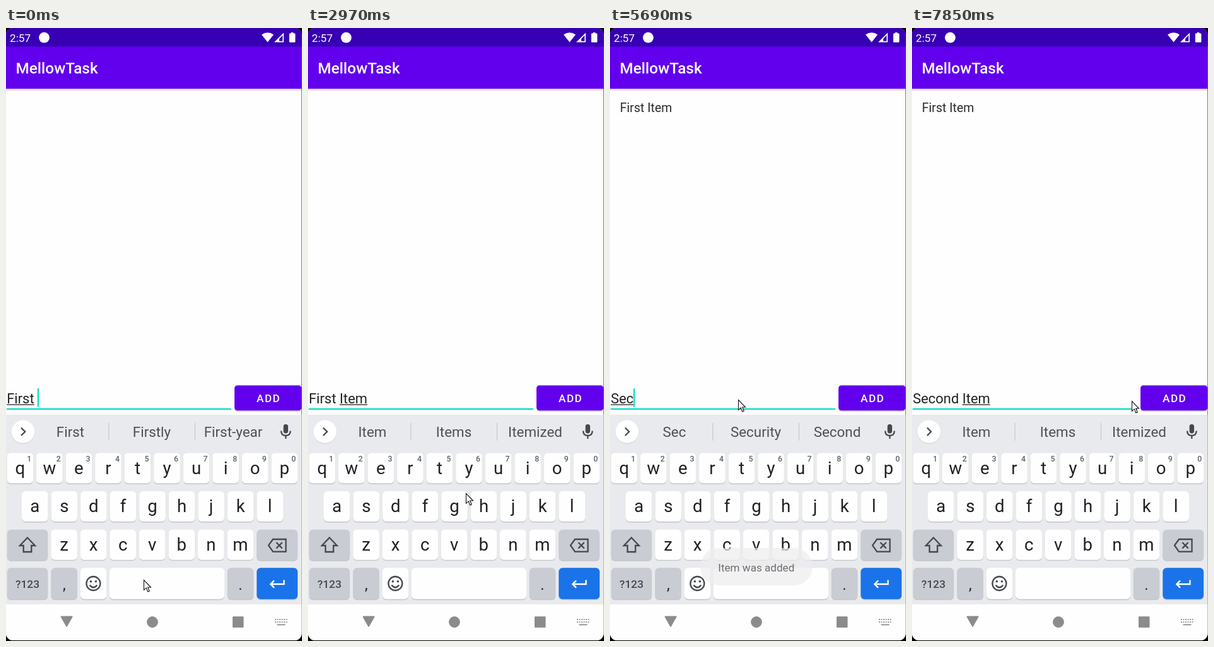
Recreate the animation shown at these times as an HTML page. Size 469 px wide and 970 px high, loop 8 s.

```html
<!DOCTYPE html>
<html lang="en">
<head>
<meta charset="utf-8">
<title>Todo list demo</title>
<style>
  html, body { margin: 0; width: 100%; height: 100%; overflow: hidden; background: #000; }
  svg { display: block; }
  text { font-family: Roboto, "Noto Sans", sans-serif; white-space: pre; }
  .mid { text-anchor: middle; }
  .med { font-weight: 500; }
  .line { fill: none; stroke: #45484d; stroke-width: 2.3; }
</style>
</head>
<body>
<svg id="stage" width="469" height="970" viewBox="0 0 469 970">
  <defs>
    <clipPath id="screen"><rect width="468.5" height="969" rx="11"/></clipPath>
    <linearGradient id="drop" x2="0" y2="1">
      <stop offset="0" stop-color="#000" stop-opacity=".22"/>
      <stop offset="1" stop-color="#000" stop-opacity="0"/>
    </linearGradient>
  </defs>
  <g clip-path="url(#screen)">
    <rect width="469" height="970" fill="#fefefe"/>

    <!-- status and app bars -->
    <rect y="96" width="469" height="4" fill="url(#drop)"/>
    <rect width="469" height="96" fill="#6200ee"/>
    <rect width="469" height="29.3" fill="#3700b3"/>
    <g fill="#fff">
      <text x="6" y="21.5" font-size="17.2">2:57</text>
      <circle cx="60.5" cy="15.2" r="8.4"/>
      <path d="M405 10.5Q414.5 4 424 10.5L414.5 22.5Z"/>
      <path d="M440 7.5V22.5H425ZM438.3 11.6L433 17V20.8H438.3Z" fill-rule="evenodd"/>
      <path d="M451.6 7H455.4V8.6H457.2Q458.4 8.6 458.4 9.8V21.6Q458.4 22.8 457.2 22.8H450Q448.8 22.8 448.8 21.6V9.8Q448.8 8.6 450 8.6H451.6Z"/>
      <text class="med" x="15.4" y="72.4" font-size="24.4">MellowTask</text>
    </g>

    <!-- list and input -->
    <text id="item" x="15.8" y="132.6" font-size="19.5" fill="#2b2b2b">First Item</text>
    <text id="hint" x="1.2" y="593.6" font-size="21.95" fill="#a0a0a0">Add an item here</text>
    <g id="typed">
      <text id="field" x="1.2" y="593.6" font-size="21.95" fill="#222"></text>
      <rect id="under" y="595.4" height="1.3" fill="#222"/>
    </g>
    <rect x="1" y="601.8" width="356" height="2.2" fill="#03dac5"/>
    <rect id="caret" width="2.2" fill="#03dac5"/>
    <g id="button">
      <rect x="362" y="567" width="106.3" height="40" rx="5" fill="#000" opacity=".18"/>
      <rect x="362" y="565.4" width="106.3" height="39.9" rx="4.8" fill="#6200ee"/>
      <rect id="ripple" x="362" y="565.4" width="106.3" height="39.9" rx="4.8" fill="#fff"/>
      <text class="med" x="397" y="592" font-size="17.1" letter-spacing="1.5" fill="#fff">ADD</text>
    </g>

    <!-- keyboard -->
    <rect y="612" width="469" height="300" fill="#e8eaed"/>
    <circle cx="27" cy="639.8" r="18.4" fill="#000" opacity=".1"/>
    <circle cx="27" cy="638.8" r="18.2" fill="#fff"/>
    <path id="chevron" class="line"/>
    <g id="words" font-size="22.4" fill="#4d5056">
      <path d="M163 625V653M299.5 625V653" stroke="#c6c8cc" stroke-width="1.2"/>
      <text class="mid" x="102" y="647.3"></text>
      <text class="mid" x="231" y="647.3"></text>
      <text class="mid" x="360" y="647.3"></text>
    </g>
    <g id="tools" class="line">
      <circle cx="86.5" cy="636" r="6.3"/><path d="M91 640.5L98.5 648"/>
      <path d="M149.5 629.5H162.5Q165 629.5 165 632V641L159 647.5H149.5Q147 647.5 147 645V632Q147 629.5 149.5 629.5ZM165 641H161Q159 641 159 643V647.5M151 639Q153 644 157.5 642.5" stroke-width="2"/>
      <path d="M152 634.5V637M160 634.5V637" stroke-width="2"/>
      <text class="mid" x="223.5" y="644" font-size="16" font-weight="900" letter-spacing="1" fill="#45484d" stroke="none">GIF</text>
      <path d="M283 630H300V649H283Z"/>
      <path d="M286.5 636.5H296.5M286.5 640.5H296.5M286.5 644.5H293.5" stroke-width="1.8"/>
      <path d="M287 629H296V633H287Z" fill="#45484d" stroke="none"/><circle cx="291.5" cy="628.8" r="2" fill="#45484d" stroke="none"/>
      <path d="M333.5 626V652" stroke="#c6c8cc" stroke-width="1.2"/>
      <g fill="#45484d" stroke="none">
        <circle cx="368" cy="639" r="2.5"/><circle cx="375.7" cy="639" r="2.5"/><circle cx="383.4" cy="639" r="2.5"/>
      </g>
    </g>
    <rect x="439.6" y="627" width="7.4" height="14.5" rx="3.7" fill="#45484d"/>
    <path class="line" d="M436 637.5Q436 645 443.3 645T450.6 637.5M443.3 645V650" stroke-width="2.2"/>
    <g id="keys"></g>
    <path class="line" d="M34 806.5L46 819H40.3V829H27.7V819H22Z"/>
    <path class="line" d="M416 818.7L423 809H443.5V828.7H423ZM428.3 814L437.7 823.4M437.7 814L428.3 823.4"/>
    <circle class="line" cx="138.4" cy="879" r="11"/>
    <circle cx="134.4" cy="875.8" r="1.8" fill="#45484d"/>
    <circle cx="142.4" cy="875.8" r="1.8" fill="#45484d"/>
    <path class="line" d="M132.5 881.5Q138.4 889 144.3 881.5" stroke-width="2"/>
    <path d="M440.5 873.5V880H419.5M425 874.3L419.2 880L425 885.7" fill="none" stroke="#fff" stroke-width="2.4"/>

    <!-- navigation bar -->
    <rect y="912" width="469" height="58" fill="#fefefe"/>
    <g fill="#8b8b8b" stroke="#8b8b8b" stroke-linejoin="round">
      <path d="M87.6 931.5H104.6L96.1 946.5Z" stroke-width="2"/>
      <circle cx="232" cy="940" r="8.4"/>
      <path d="M359.5 931.7H376V948.2H359.5Z"/>
    </g>
    <path d="M426 936H446M426 940H446" stroke="#999" stroke-width="2" stroke-dasharray="2 1.5"/>
    <path d="M429.5 944.3H442.5" stroke="#999" stroke-width="2"/>

    <g id="toast">
      <rect x="143" y="823" width="178" height="59" rx="29.5" fill="#eeeeef"/>
      <text class="mid" x="231.8" y="860" font-size="17.1" fill="#333">Item was added</text>
    </g>
    <path id="mouse" d="M.5 .5V16.3L4.2 12.9L6.8 19L9.3 18L6.7 12H11.5Z" fill="#fff" stroke="#111" stroke-width="1.1"/>
  </g>
</svg>
<script>
const LOOP = 8000, LEFT = 1.2, LINE = 25.7;
const $ = id => document.getElementById(id);
const set = (el, attrs) => { for (const k in attrs) el.setAttribute(k, attrs[k]); };
const show = (el, on) => set(el, { visibility: on ? "visible" : "hidden" });

function add(tag, attrs, label = "") {
  const el = document.createElementNS("http://www.w3.org/2000/svg", tag);
  set(el, attrs);
  el.textContent = label;
  $("keys").append(el);
}

function key(x, y, w, h, fill = "#fefefe") {
  add("rect", { x, y: y + 1.4, width: w, height: h, rx: 6, fill: "#c3c5c9" });
  add("rect", { x, y, width: w, height: h, rx: 6, fill });
}

function label(x, y, size, text, fill = "#1f2124", weight = 400) {
  add("text", { class: "mid", x, y, "font-size": size, fill, "font-weight": weight }, text);
}

function letters(row, x, y) {
  [...row].forEach((ch, i) => {
    const left = x + i * 46.55;
    key(left, y, 41.6, 48);
    label(left + 20.8, y + 33, 27.6, ch);
  });
}

function buildKeys() {
  const grey = "#c9ccd2";
  letters("qwertyuiop", 1.5, 672.5);
  [..."1234567890"].forEach((d, i) => label(36.8 + i * 46.55, 685.8, 12.4, d, "#5f6368", 500));
  letters("asdfghjkl", 25, 733);
  letters("zxcvbnm", 71.3, 793.7);
  key(1.8, 793.7, 64.4, 48.6, grey);
  key(397.3, 793.7, 64.8, 48.6, grey);
  key(1.8, 854.2, 64.4, 49.6, grey);
  key(71.5, 854.2, 41.4, 49.6, grey);
  key(118, 854.2, 41.4, 49.6);
  key(164, 854.2, 182, 49.6);
  key(350.8, 854.2, 41.4, 49.6, grey);
  key(397.3, 854.2, 64.8, 49.6, "#1a73e8");
  label(34, 885.6, 17.4, "?123", "#45484d", 500);
  label(92.3, 889, 24, ",");
  label(371.5, 889, 24, ".");
}

// Each step changes part of the state; mark is the underlined range of the text.
const steps = [
  [0, { text: "First ", mark: [0, 5], words: "First Firstly First-year", caret: 1, rows: 1, mouse: [218, 873], item: 0, toast: 0, ripple: 0 }],
  [120, { mark: null, words: "one day time" }],
  [390, { text: "First I", mark: [6, 7] }],
  [510, { words: "I I'm It" }],
  [630, { text: "First It", mark: [6, 8], words: "It It's Item" }],
  [910, { text: "First Item", mark: [6, 9], words: "Ite Item It's" }],
  [1190, { mark: [6, 10], words: "Item Items Itemized" }],
  [1310, { rows: 2 }],
  [1590, { mark: null, words: "I The My" }],
  [2020, { caret: 0 }],
  [2420, { rows: 1, caret: 1 }],
  [2540, { mark: [6, 10], words: "Item Items Itemized" }],
  [2970, { caret: 0, mouse: [250, 736] }],
  [3090, { mouse: [394, 627] }],
  [3240, { mouse: [409, 580] }],
  [3490, { text: "", mark: null, caret: 1, ripple: .24 }],
  [3610, { words: "", item: .5, ripple: .2 }],
  [3760, { item: 1, toast: .4, ripple: .12, mouse: [395, 585] }],
  [3880, { toast: 1, ripple: .05, mouse: [330, 588] }],
  [4000, { caret: 0, ripple: 0, mouse: [257, 586] }],
  [4120, { mouse: [202, 584] }],
  [4270, { mouse: [203, 588] }],
  [4520, { text: "s", caret: 1 }],
  [4640, { mark: [0, 1] }],
  [4760, { text: "", mark: null }],
  [4910, { text: "S" }],
  [5060, { mark: [0, 1] }],
  [5180, { words: "So Sorry Some" }],
  [5330, { text: "Se", mark: [0, 2] }],
  [5450, { words: "Se See Send" }],
  [5570, { text: "Sec", mark: [0, 3] }],
  [5690, { words: "Sec Security Second", toast: .7 }],
  [5840, { text: "Secon", mark: [0, 5], toast: .3 }],
  [5960, { text: "Second", mark: [0, 6], words: "Secon Second Seconds", toast: 0 }],
  [6210, { text: "Second ", words: "Second Seconds Secondary" }],
  [6330, { mark: null, words: "time one day" }],
  [6480, { text: "Second I", mark: [7, 8] }],
  [6600, { words: "I I'm Interview" }],
  [6880, { text: "Second It", mark: [7, 9], words: "It Item It's" }],
  [7030, { text: "Second Item", mark: [7, 10], words: "Ite Item It's" }],
  [7180, { mark: [7, 11], words: "Item Items Itemized" }],
  [7580, { mouse: [213, 587] }],
  [7730, { caret: 0, mouse: [290, 609] }],
  [7850, { mouse: [348, 590] }]
];

const pen = document.createElement("canvas").getContext("2d");
pen.font = '21.95px Roboto, "Noto Sans", sans-serif';
const widthOf = text => pen.measureText(text).width;
const wordSlots = $("words").querySelectorAll("text");

function draw(t) {
  const s = Object.assign({}, ...steps.filter(step => step[0] <= t).map(step => step[1]));
  const two = s.rows === 2;
  const lift = `translate(0 ${two ? -LINE : 0})`;

  $("field").textContent = s.text;
  show($("hint"), !s.text);
  set($("typed"), { transform: lift });
  set($("button"), { transform: lift });
  show($("under"), s.mark);
  if (s.mark) {
    const from = widthOf(s.text.slice(0, s.mark[0]));
    const to = widthOf(s.text.slice(0, s.mark[1]));
    set($("under"), { x: LEFT + from, width: to - from });
  }
  show($("caret"), s.caret);
  set($("caret"), {
    x: LEFT - .2 + (two ? 0 : widthOf(s.text)),
    y: two ? 573.5 : 570.3,
    height: two ? 26 : 29.2
  });

  const words = s.words ? s.words.split(" ") : [];
  wordSlots.forEach((el, i) => { el.textContent = words[i] || ""; });
  show($("words"), s.words);
  show($("tools"), !s.words);
  set($("chevron"), { d: s.words ? "M24 632.5L30.2 638.8L24 645" : "M30 632.5L23.8 638.8L30 645" });

  for (const id of ["item", "toast", "ripple"]) set($(id), { opacity: s[id] });
  set($("mouse"), { transform: `translate(${s.mouse})` });
}

buildKeys();
const start = performance.now();
function tick() {
  draw((performance.now() - start) % LOOP);
  requestAnimationFrame(tick);
}
tick();
</script>
</body>
</html>
```
